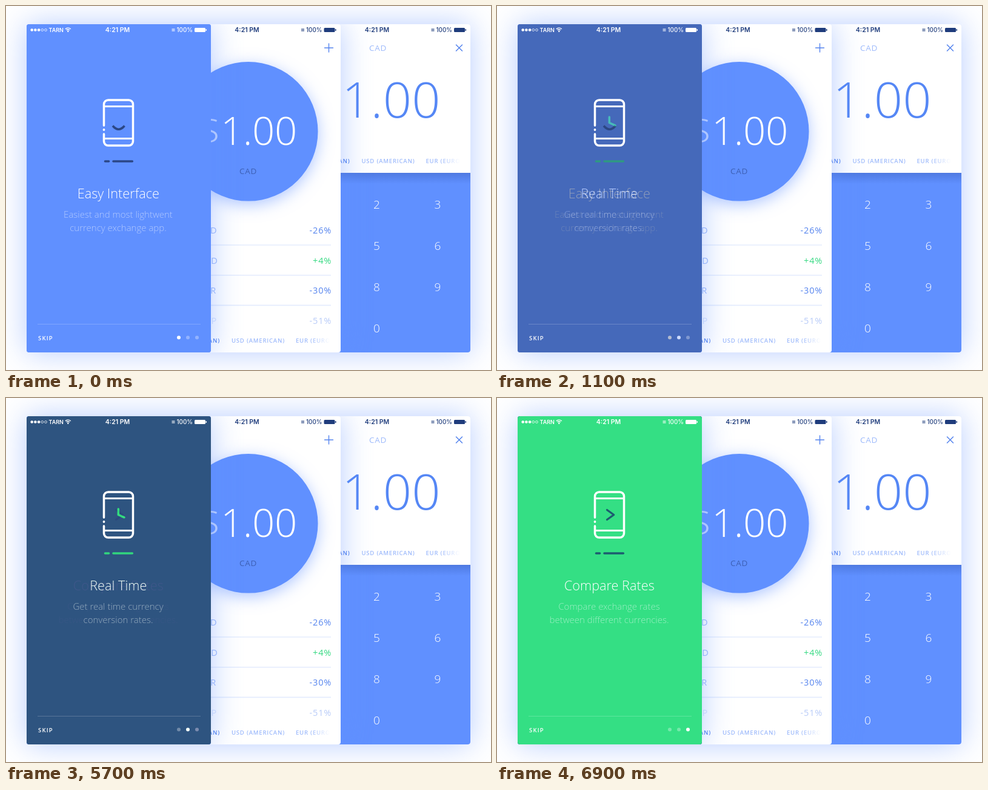
An HTML page with a canvas that plays this animation: 800x600 px, repeating every 8000 ms.

```html
<!DOCTYPE html>
<html lang="en">
<head>
<meta charset="utf-8">
<title>Currency app onboarding</title>
<style>
  html, body { margin: 0; width: 100%; height: 100%; overflow: hidden; background: #fff; }
  canvas { display: block; }
</style>
</head>
<body>
<canvas id="stage" width="800" height="600"></canvas>
<script>
const W = 800, H = 600, LOOP = 8000;
const BLUE = '#6090ff', LINK = '#5584ee', PALE = '#9fbbfb', NAVY = '#1f3c7c';
const SANS = '"Open Sans", "Noto Sans", sans-serif';
const UI = 'Inter, Roboto, sans-serif';
const PANEL = { y: 30, w: 304.5, h: 541 };

const pages = [
  { bg: BLUE, ink: '#2b4786', title: 'Easy Interface',
    lines: ['Easiest and most lightwent', 'currency exchange app.'], glyph: smile },
  { bg: '#2e4880', ink: '#34e07f', title: 'Real Time',
    lines: ['Get real time currency', 'conversion rates.'], glyph: clock },
  { bg: '#34df84', ink: '#1d5c70', title: 'Compare Rates',
    lines: ['Compare exchange rates', 'between different currencies.'], glyph: chevron }
];

function layer(draw) {
  const c = document.createElement('canvas');
  c.width = W;
  c.height = H;
  draw(c.getContext('2d'));
  return c;
}

function text(g, str, x, y, { size, color, weight = 400, align = 'left', gap = 0, family = SANS }) {
  g.font = `${weight} ${size}px ${family}`;
  g.letterSpacing = gap + 'px';
  g.textAlign = align;
  g.fillStyle = color;
  g.fillText(str, x, y);
  return g.measureText(str).width;
}

function line(g, pts, color, width, cap = 'round') {
  g.strokeStyle = color;
  g.lineWidth = width;
  g.lineCap = cap;
  g.lineJoin = 'round';
  g.beginPath();
  pts.forEach(([x, y]) => g.lineTo(x, y));
  g.stroke();
}

function disc(g, x, y, r, color) {
  g.fillStyle = color;
  g.beginPath();
  g.arc(x, y, r, 0, 7);
  g.fill();
}

function box(g, x, y, w, h, r) {
  g.beginPath();
  g.roundRect(x, y, w, h, r);
}

function fade(g, x0, y0, x1, y1, from, to) {
  const f = g.createLinearGradient(x0, y0, x1, y1);
  f.addColorStop(0, from);
  f.addColorStop(1, to);
  return f;
}

function glow(g, color, blur, dy = 0) {
  g.shadowColor = color;
  g.shadowBlur = blur;
  g.shadowOffsetY = dy;
}

// Runs draw() inside a rounded panel that casts a soft shadow.
function panel(g, x, bg, draw) {
  g.save();
  box(g, 34, PANEL.y, 732, PANEL.h, 4);
  g.clip();
  box(g, x, PANEL.y, PANEL.w, PANEL.h, 4);
  glow(g, 'rgba(96,144,255,.45)', 50);
  g.fillStyle = bg;
  g.fill();
  glow(g, 'transparent', 0);
  g.clip();
  draw();
  g.restore();
}

function statusBar(g, dx, color) {
  text(g, '4:21 PM', 184 + dx, 43, { size: 10.5, weight: 600, color, align: 'center', family: UI });
  g.globalAlpha = 0.5;
  g.fillStyle = color;
  g.fillRect(273.5 + dx, 37, 5, 5);
  g.globalAlpha = 1;
  text(g, '100%', 308 + dx, 43, { size: 9.8, weight: 500, color, align: 'right', family: UI });
  box(g, 311 + dx, 36, 18, 7, 1.5);
  g.fill();
  g.fillRect(329.6 + dx, 38, 1.4, 3);
}

function carrier(g) {
  for (let i = 0; i < 5; i++) {
    const x = 42.7 + i * 5.7;
    if (i < 3) disc(g, x, 39.5, 2.3, '#fff');
    else {
      g.strokeStyle = '#fff';
      g.lineWidth = 0.8;
      g.beginPath();
      g.arc(x, 39.5, 1.9, 0, 7);
      g.stroke();
    }
  }
  text(g, 'TARN', 70.5, 43, { size: 9, weight: 600, color: '#fff', family: UI });
  g.strokeStyle = '#fff';
  g.lineWidth = 1.4;
  g.lineCap = 'butt';
  for (const r of [3.6, 6.2]) {
    g.beginPath();
    g.arc(102.3, 42.3, r, -Math.PI * 0.76, -Math.PI * 0.24);
    g.stroke();
  }
  disc(g, 102.3, 41.8, 1.3, '#fff');
}

function currencyTabs(g, dx, y) {
  const style = { size: 9.5, weight: 600, gap: 0.8 };
  text(g, 'CAD (CANADIAN)', 353 + dx, y, { ...style, color: LINK, align: 'right' });
  text(g, 'USD (AMERICAN)', 372 + dx, y, { ...style, color: PALE });
  const end = 534 + dx;
  g.save();
  g.beginPath();
  g.rect(470 + dx, y - 15, 64, 25);
  g.clip();
  const tail = fade(g, end - 32, 0, end, 0, PALE, 'rgba(159,187,251,0)');
  text(g, 'EUR (EUROPEAN)', 478 + dx, y, { ...style, color: tail });
  g.restore();
}

function keypadPanel(g) {
  panel(g, 461.5, '#fff', () => {
    statusBar(g, 428, NAVY);
    text(g, 'CAD', 613.5, 74, { size: 13.5, color: PALE, align: 'center', gap: 0.7 });
    line(g, [[742.5, 64], [752.5, 74]], LINK, 1.5);
    line(g, [[752.5, 64], [742.5, 74]], LINK, 1.5);
    text(g, '1.00', 717, 184, { size: 82, weight: 300, color: '#5587f5', align: 'right', gap: 0.7 });
    currencyTabs(g, 214.5, 259);

    g.fillStyle = BLUE;
    g.fillRect(461, 275, 306, 297);
    g.fillStyle = fade(g, 0, 275, 0, 293, 'rgba(50,85,175,.38)', 'rgba(50,85,175,0)');
    g.fillRect(461, 275, 306, 18);
    const key = { size: 19, weight: 300, color: '#fff', align: 'center' };
    for (let n = 1; n <= 9; n++) {
      text(g, n, 511 + ((n - 1) % 3) * 100.5, 334 + Math.floor((n - 1) / 3) * 68.2, key);
    }
    text(g, '0', 611.5, 538.2, key);
  });
}

function ratesPanel(g) {
  panel(g, 247.5, '#fff', () => {
    statusBar(g, 213.5, NAVY);
    line(g, [[525.5, 69], [539.5, 69]], LINK, 1.4);
    line(g, [[532.5, 62], [532.5, 76]], LINK, 1.4);

    glow(g, 'rgba(96,144,255,.5)', 26, 6);
    disc(g, 399.7, 206.8, 114.8, BLUE);
    glow(g, 'transparent', 0);
    const price = { size: 64.5, weight: 300, align: 'right' };
    const w = text(g, '1.00', 480, 229, { ...price, color: '#fff' });
    text(g, '$', 480 - w, 229, { ...price, color: 'rgba(255,255,255,.6)' });
    text(g, 'CAD', 399.5, 277, { size: 13.5, color: '#3e60b4', align: 'center', gap: 0.7 });

    const rows = [['USD', '-26%'], ['AUD', '+4%'], ['EUR', '-30%'], ['GBP', '-51%']];
    rows.forEach(([code, change], i) => {
      const y = 375 + i * 49.7, cell = { size: 14.5, gap: 0.8 };
      g.globalAlpha = i === 3 ? 0.42 : 1;
      text(g, code, 317, y, { ...cell, color: PALE });
      const color = change[0] === '+' ? '#35d982' : LINK;
      text(g, change, 537, y, { ...cell, color, align: 'right' });
      g.globalAlpha = 1;
      if (i < 3) line(g, [[300, y + 19], [536, y + 19]], '#e4ecfd', 1.6, 'butt');
    });
    currencyTabs(g, 0, 555);
  });
}

function smile(g) {
  g.beginPath();
  g.moveTo(176, 197.5);
  g.quadraticCurveTo(185.7, 209, 195.5, 197.5);
  g.stroke();
}

function clock(g, ink) {
  line(g, [[185.3, 183], [185.3, 192.5], [195, 196.8]], ink, 3.5);
}

function chevron(g, ink) {
  line(g, [[181.5, 184.5], [192.7, 192.5], [181.5, 200.5]], ink, 3.2);
}

function phone(g) {
  const l = 161.5, r = 209.5, t = 155, b = 230, k = 7;
  g.strokeStyle = '#fff';
  g.lineWidth = 3.5;
  g.lineCap = 'round';
  g.beginPath();
  g.moveTo(l, 197);
  g.arcTo(l, t, r, t, k);
  g.arcTo(r, t, r, b, k);
  g.arcTo(r, b, l, b, k);
  g.arcTo(l, b, l, t, k);
  g.lineTo(l, 211);
  g.stroke();
  disc(g, l, 204, 1.9, '#fff');
  line(g, [[l, 165.5], [r, 165.5]], '#fff', 3.2, 'butt');
  line(g, [[l, 218.5], [r, 218.5]], '#fff', 3.2, 'butt');
}

function introPage(g, { bg, ink, title, lines, glyph }, index) {
  box(g, 34, PANEL.y, 304, PANEL.h, 4);
  g.fillStyle = bg;
  g.fill();
  statusBar(g, 0, '#fff');
  carrier(g);
  phone(g);
  g.strokeStyle = ink;
  g.lineWidth = 3.5;
  glyph(g, ink);
  line(g, [[163.5, 256], [169.5, 256]], ink, 3.6);
  line(g, [[177, 256], [208.3, 256]], ink, 3.6);
  text(g, title, 185.3, 316.5, { size: 21.7, weight: 300, color: '#fff', align: 'center' });
  lines.forEach((s, i) => text(g, s, 185, 349.3 + i * 22,
    { size: 15, weight: 300, color: 'rgba(255,255,255,.52)', align: 'center' }));
  line(g, [[52, 524.5], [321, 524.5]], 'rgba(255,255,255,.2)', 1, 'butt');
  text(g, 'SKIP', 53, 551, { size: 9.5, weight: 600, color: '#fff', gap: 1.2 });
  for (let i = 0; i < 3; i++) {
    disc(g, 285 + i * 15, 546.5, 3, i === index ? '#fff' : 'rgba(255,255,255,.32)');
  }
}

const backdrop = layer(g => {
  g.fillStyle = '#fff';
  g.fillRect(0, 0, W, H);
  glow(g, 'rgba(96,144,255,.45)', 50);
  box(g, 34, PANEL.y, 732, PANEL.h, 4);
  g.fill();
  glow(g, 'transparent', 0);
  keypadPanel(g);
  ratesPanel(g);
  panel(g, 33.5, BLUE, () => {});
});
// The leftmost panel only lends its shadow; its face comes from the intro pages.
const faces = pages.map((p, i) => layer(g => introPage(g, p, i)));
const ctx = document.getElementById('stage').getContext('2d');

// Dissolve in 13 even steps of 100 ms.
function mix(t, start) {
  const step = Math.floor((t - start) / 100) + 1;
  return Math.min(13, Math.max(0, step)) / 13;
}

function render(t) {
  ctx.globalAlpha = 1;
  ctx.drawImage(backdrop, 0, 0);
  ctx.drawImage(faces[0], 0, 0);
  ctx.globalAlpha = mix(t, 500);
  ctx.drawImage(faces[1], 0, 0);
  ctx.globalAlpha = mix(t, 5700);
  ctx.drawImage(faces[2], 0, 0);
}

const begin = performance.now();
function tick() {
  render((performance.now() - begin) % LOOP);
  requestAnimationFrame(tick);
}
tick();
</script>
</body>
</html>
```
